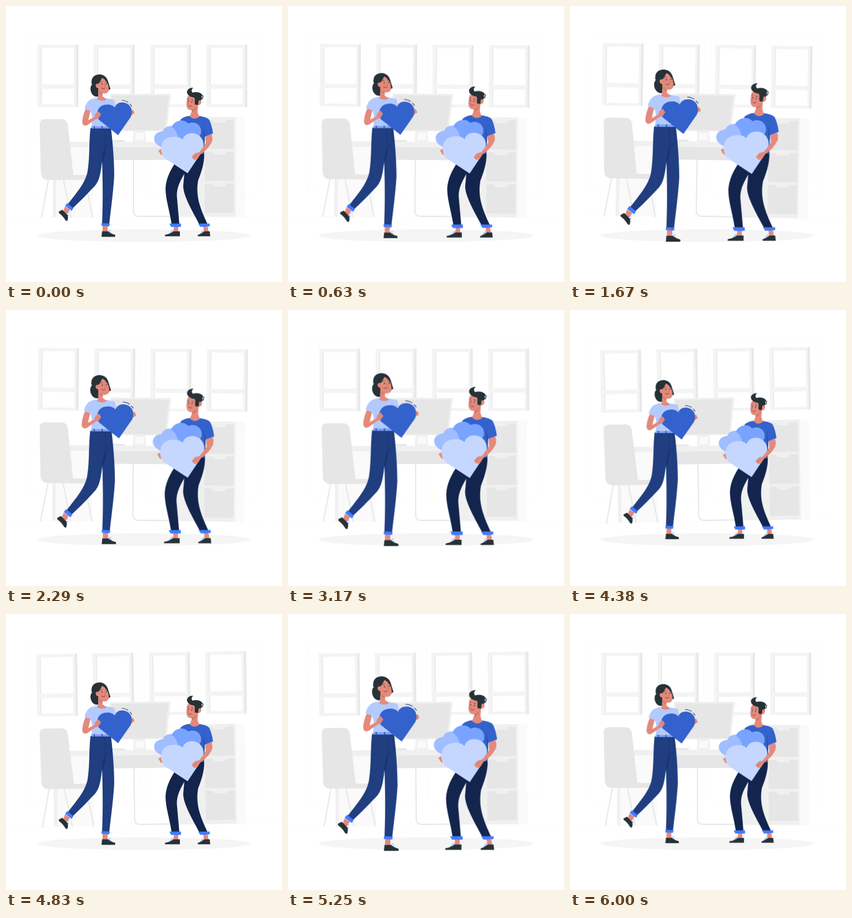
An HTML page that plays this animation: 500x500 px, repeating every 6.04 s.

```html
<!DOCTYPE html>
<html lang="en">
<head>
<meta charset="utf-8">
<title>Carrying hearts</title>
<style>
  html, body { margin: 0; width: 100%; height: 100%; overflow: hidden; background: #fff; }
  svg { display: block; width: 100vw; height: 100vh; }
  #room { transform-origin: 250px 226px; }
  #woman { transform-origin: 164px 271px; }
  #man { transform-origin: 325px 282.5px; }
  .skin { fill: #e4897b; }
  .dark { fill: #263238; }
  .royal { fill: #3362cc; }
  .cuff { fill: #407bff; }
  .line { fill: none; stroke-linecap: round; stroke-linejoin: round; }
  .face { stroke: #263238; stroke-width: .7; }
  .lace { stroke: #407bff; stroke-width: .8; }
</style>
</head>
<body>
<svg viewBox="0 0 500 500">
  <defs>
    <g id="window">
      <path fill="#f4f4f4" d="M0 0H70V113H0Z"/>
      <path fill="#e8e8e8" d="M70 0H74V113H70Z"/>
      <path fill="#ebebeb" d="M6 6H8V72H6ZM6 80H8V108H6Z"/>
      <path fill="#fff" d="M8 6H66V72H8ZM8 80H66V108H8Z"/>
    </g>
    <g id="drawer">
      <path fill="#e6e6e6" d="M0 0H53V53H0Z"/>
      <path fill="#f0f0f0" d="M14 0H39Q38 5 34 5H19Q15 5 14 0Z"/>
    </g>
  </defs>

  <g id="room">
    <path class="line" stroke="#fbfbfb" d="M0 383H500M38 55H242V338H38ZM253 55H457V338H253Z"/>
    <use href="#window" x="57" y="70"/>
    <use href="#window" x="159" y="70"/>
    <use href="#window" x="261" y="70"/>
    <use href="#window" x="363" y="70"/>

    <path fill="#fafafa" d="M91 256H158V383H91ZM415 201H433V383H415Z"/>
    <path fill="#f0f0f0" d="M85 256H91V383H85ZM303 279H357V382H303ZM357 201H416V382H357Z"/>
    <use href="#drawer" x="360" y="206"/>
    <use href="#drawer" x="360" y="264"/>
    <use href="#drawer" x="360" y="322"/>

    <path class="line" stroke="#e6e6e6" stroke-width="2" d="M231 279V371Q231 381 241 381H303"/>
    <path fill="#f0f0f0" d="M100 246H357V256H100Z"/>
    <path fill="#e6e6e6" d="M182 256H357V279H182Z"/>
    <path fill="#f0f0f0" d="M189 159H299L291 227H181ZM231 227H252L254 246H230Z"/>
    <path fill="#fafafa" d="M234 230H250V243H234Z"/>
    <path fill="#e6e6e6" d="M192 162H295L288 225H184Z"/>
    <path fill="#e6e6e6" d="M192 243H215V246H190Z"/>

    <path class="line" stroke="#e6e6e6" stroke-width="2" d="M77 314 64 383M104 314 118 383M143 314 157 383"/>
    <path fill="#e6e6e6" d="M70 205H101Q110 205 112 215L122 306H149Q156 306 156 311T149 315H77Q64 315 63 302L61 215Q61 205 70 205Z"/>
  </g>

  <ellipse cx="249.500" cy="416" rx="193.500" ry="11.500" fill="#f5f5f5"/>

  <g id="woman">
    <path class="skin" d="M107 363 116 369 109 378 103 373ZM175 397H184V410H175Z"/>
    <path class="dark" d="M96 372 102 369 112 379Q113 385 111 389Q109 390 107 387Q103 380 96 375Q95 373 96 372Z"/>
    <path class="dark" d="M174 408H185Q191 413 197 414Q199 416 197 418H173Z"/>
    <path class="line lace" d="M110 375 114 374M111 378 114 379M185 408 189 406M187 410 190 410"/>
    <path fill="#203e80" d="M153 221H190C194 252 196 286 196 308C194 340 190 368 187 395H174C176 352 175 310 174 281C171 309 168 320 157 330C144 344 133 355 121 366L112 359C129 337 145 319 148 298C152 272 150 247 153 221Z"/>
    <path fill="#193166" d="M180 250C178 262 174 272 174 286C178 276 180 263 180 250Z"/>
    <path class="line" stroke="#193166" stroke-width=".6" d="M188 224 190 250Q185 256 180 251L179 224"/>
    <path class="cuff" d="M111 357 122 366 119 371 107 362ZM173 393 188 394 187 399 173 398Z"/>
    <path fill="#b3cafe" d="M157 168C172 165 182 167 196 170L199 184 191 194V219H155L156 200 153 190 142 186C145 176 149 170 157 168Z"/>
    <path fill="#7aa1fb" d="M155 218H190L191 222H154Z"/>
    <path class="line" stroke="#203e80" stroke-width="1.400" d="M160 218V222M174 218V222"/>

    <path class="dark" d="M155 137C155 128 162 124 170 124C180 125 184 131 186 141L189 151 184 152 167 158V164C160 166 153 159 153 150Q153 145 156 142Q154 140 155 137Z"/>
    <path class="skin" d="M167 149C161 148 161 140 166 141C168 139 170 134 174 130C182 131 187 139 187 148C187 157 180 160 175 158L175 164 182 169Q175 174 165 169L167 164Z"/>
    <path fill="#c87369" d="M168 154Q171 158 175 158V160Q170 160 168 154Z"/>
    <path class="dark" d="M168 127C180 125 184 133 186 141L189 150 186 152C187 143 182 134 174 130C171 136 169 141 166 141Z"/>
    <path class="line face" d="M171 138 174 137M180 136 183 137M173 149Q176 151 179 149"/>
    <path class="line" stroke="#c87369" stroke-width=".8" d="M178 141 181 146 178 146"/>
    <circle class="dark" cx="174" cy="141.500" r="1"/>
    <circle class="dark" cx="182" cy="140.500" r="1"/>

    <path class="skin" d="M223 191 230 188 233 194 226 199Z"/>
    <path class="royal" d="M203 234 168 206C162 195 166 181 179 179C187 177 194 180 197 184C199 177 206 174 213 175C226 177 231 189 226 201Z"/>
    <path class="line" stroke="#264a99" stroke-width="1.200" d="M210 171Q216 171 221 174.500M224.500 177.500 228 181.500"/>
    <path class="skin" d="M144 187 153 190 149 207 160 201 162 195 168 191 172 197 168 203 161 206 147 216Q139 219 138 210Q139 198 144 187Z"/>
    <path class="line" stroke="#c87369" stroke-width=".7" d="M165 196 169 200"/>
  </g>

  <g id="man">
    <path class="skin" d="M304 398H312V410H304ZM357 398 365 397 367 410H359Z"/>
    <path class="dark" d="M303 408H315V417H288Q287 415 289 414Q297 413 303 408ZM359 408H369L370 417H348Q346 415 349 414Q355 412 359 408Z"/>
    <path class="line lace" d="M299 408 304 406M297 411 301 410M354 409 358 406M352 412 356 410"/>
    <path fill="#13254d" d="M308 282 359 266C360 285 353 303 348 316C343 345 352 367 365 395H350C336 369 321 343 321 326L323 304C312 323 308 334 310 350Q312 372 314 395H300C296 369 289 350 289 330C290 312 298 297 308 282Z"/>
    <path class="cuff" d="M296 394H317L317 400H299ZM348 394H369V399L352 400Z"/>
    <path class="royal" d="M316 206Q322 200 333 199H348Q364 201 368 206Q373 216 375 231L360 237 359 268H320Z"/>
    <path fill="#264a99" d="M357 219 360 237 359 254Z"/>

    <path class="skin" d="M329 164C336 158 347 162 349 171C354 168 356 176 351 179L348 180 347 192 350 201Q341 208 333 200L337 189C329 189 326 184 327 175Z"/>
    <path fill="#c87369" d="M337 189Q343 187 346 182 343 191 336 192Z"/>
    <path class="dark" d="M339 148C331 148 327 153 328 157C329 162 334 165 341 166C344 171 340 174 343 179L348 179 349 171 353 171C356 168 357 163 355 160C351 156 344 155 338 157Q334 153 339 148ZM354 164 358 162 356 170Z"/>
    <path class="line face" d="M328 169 331 168M336 170 339 171M331 181Q333 183 336 181"/>
    <path class="line" stroke="#c87369" stroke-width=".8" d="M331 173 329 178 332 178"/>
    <circle class="dark" cx="330.500" cy="172.500" r=".9"/>
    <circle class="dark" cx="336.500" cy="174" r=".9"/>

    <path class="skin" d="M276 262 285 257 288 268 281 270Z"/>
    <path fill="#a0bdff" d="M278 254C263 246 266 228 284 227C287 216 306 213 311 226L314 252 300 268Z"/>
    <path fill="#79a3ff" d="M300 219C306 206 323 204 330 213C343 207 356 217 353 231L340 255 312 240Q310 225 300 219Z"/>
    <path fill="#c6d7ff" d="M329 303 288 276C278 267 278 245 293 239C304 235 314 236 320 242C323 232 333 229 342 231C356 235 362 250 355 264Z"/>
    <path class="skin" d="M361 237 372 232Q375 238 373 246Q366 260 352 269L347 277 341 279 336 274 342 267 350 265 362 249Z"/>
    <path class="line" stroke="#c87369" stroke-width=".7" d="M340 273 345 271"/>
  </g>
</svg>
<script>
  const LOOP = 6040;
  const DRAWN = 1.02; // scale at which the figures are drawn
  const $ = id => document.getElementById(id);

  // Each row: position in the cycle, value
  const play = (id, rows, format, duration, delay = 0) =>
    $(id).animate(
      rows.map(([offset, value]) => ({ offset, transform: format(value) })),
      { duration, delay, iterations: Infinity, easing: 'linear' }
    ).startTime = 0;

  const beat = [[0, 1], [.1, 1.1], [.25, 1], [.4, 1], [.5, 1.1], [.6, 1], [1, 1]];
  const sway = [[0, 0], [.25, 1], [.75, -1], [1, 0]];

  play('room', sway, v => `rotate(${v}deg)`, LOOP);
  for (const id of ['woman', 'man'])
    play(id, beat, v => `scale(${v / DRAWN})`, LOOP / 4, -30);
</script>
</body>
</html>
```
